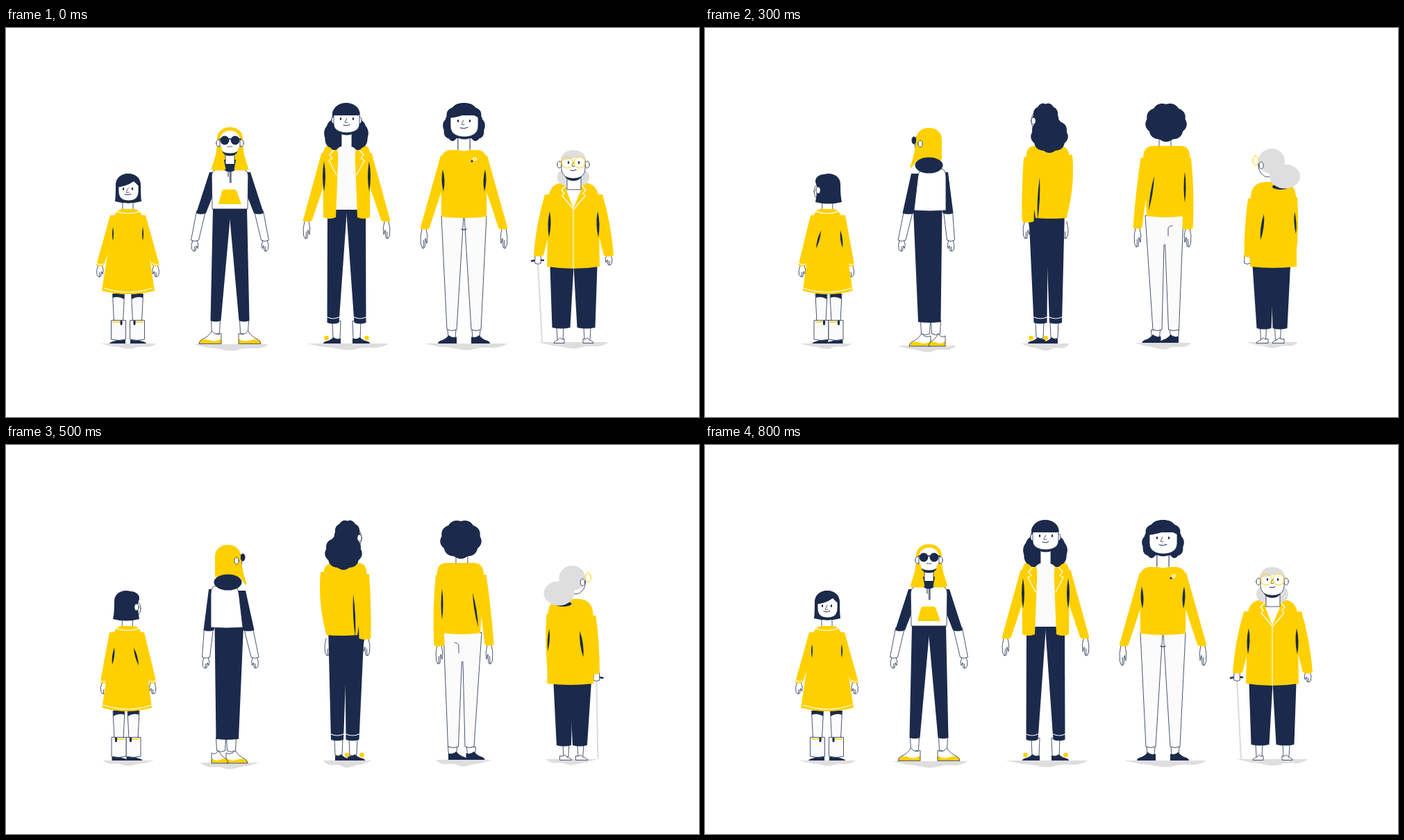
Write an HTML page with a canvas that moves like this. It is 998 px wide and 561 px high and loops after 3100 ms.

```html
<!DOCTYPE html>
<html lang="en">
<head>
<meta charset="utf-8">
<title>Turning figures</title>
<style>
html, body { margin: 0; width: 100%; height: 100%; overflow: hidden; background: #fff; }
canvas { display: block; }
</style>
</head>
<body>
<canvas id="c" width="998" height="561"></canvas>
<script>
const g = document.getElementById('c').getContext('2d');
const N = '#1b2a4b', Y = '#ffd000', G = '#dedede', W = '#fff', O = '#fbfbfb';
g.lineCap = g.lineJoin = 'round';

const fill = (c, d) => { g.fillStyle = c; g.fill(new Path2D(d)); };
const line = (d, c = N, w = 0.8) => { g.strokeStyle = c; g.lineWidth = w; g.stroke(new Path2D(d)); };
const both = (d, c = W) => { fill(c, d); line(d); };
const oval = (x, y, rx, ry = rx) =>
  `M${x - rx} ${y}a${rx} ${ry} 0 1 0 ${2 * rx} 0a${rx} ${ry} 0 1 0 ${-2 * rx} 0Z`;

function scaleAt(ax, k, draw) {
  g.save();
  g.translate(ax, 0);
  g.scale(k, 1);
  g.translate(-ax, 0);
  draw();
  g.restore();
}
const pair = (ax, draw) => { draw(); scaleAt(ax, -1, draw); };

// Tapered strip between two points, bent sideways by bow
function limb(c, x, y, w, x2, y2, w2, bow = 0, edged = c == O || c == W) {
  const mx = (x + x2) / 2 + bow, my = (y + y2) / 2, mw = (w + w2) / 4;
  const d = `M${x - w / 2} ${y}Q${mx - mw} ${my} ${x2 - w2 / 2} ${y2}Q${x2} ${y2 + 3} ${x2 + w2 / 2} ${y2}Q${mx + mw} ${my} ${x + w / 2} ${y}Z`;
  (edged ? both : (p, k) => fill(k, p))(d, c);
}

// Garment with rounded shoulders: top a..b, bottom a2..b2
function slab(c, a, b, y, a2, b2, y2, round = 12, sag = 3) {
  const k = .2, ys = y + (y2 - y) * k;
  const d = `M${a + round} ${y}H${b - round}Q${b} ${y} ${b + (b2 - b) * k} ${ys}L${b2} ${y2}
    Q${(a2 + b2) / 2} ${y2 + sag * 2} ${a2} ${y2}L${a + (a2 - a) * k} ${ys}Q${a} ${y} ${a + round} ${y}Z`;
  c == W ? both(d, c) : fill(c, d);
}
const slit = (x, y, h, lean = 0, w = 3) =>
  fill(N, `M${x} ${y}Q${x + lean / 2 + w} ${y + h * .5} ${x + lean} ${y + h}Q${x + lean / 2 - w} ${y + h * .5} ${x} ${y}Z`);

function shadow(a, b, y, h = 10) {
  const s = (b - a) / 5;
  fill(G, `M${a} ${y}H${b}q${-s * .4} ${h * .7} ${-s} ${h * .6}t${-s} ${h * .2}t${-s} 0t${-s} ${-h * .3}Z`);
}
function hand(x, y, h = 18, flip = 1) {
  const p = (u, v) => `${x + u * flip} ${y + v * h}`;
  both(`M${p(-3, 0)}Q${p(-6, .4)} ${p(-4.500, .8)}L${p(-2, 1)} ${p(1, .95)} ${p(2, .5)} ${p(4, .75)}Q${p(6, .4)} ${p(3, 0)}`);
  line(`M${p(-1, .95)}L${p(-.5, .6)}`);
}
const shoePath = (x, y, w, h) =>
  `M${x} ${y}V${y - h * .8}Q${x + w * .25} ${y - h * .6} ${x + w * .42} ${y - h}Q${x + w * .6} ${y - h * .5} ${x + w * .85} ${y - h * .35}Q${x + w} ${y - h * .2} ${x + w} ${y}Z`;
const shoe = (x, y, w, h) => fill(N, shoePath(x, y, w, h));
const slipper = (x, y, w) => both(shoePath(x, y, w, 7));
const pump = (x, w) => { shoe(x, 455, w, 9); fill(Y, oval(x + w * .82, 447, 3.3)); };
function sneaker(x, y, w) {
  const d = shoePath(x, y, w, 18);
  fill(W, d);
  fill(Y, `M${x} ${y}h${w}q${-w * .05} -6 ${-w * .22} -6t${-w * .35} 2T${x} ${y - 7}Z`);
  line(d);
}
const ankle = (x, y, w, y2) => limb(W, x, y, w, x, y2, w - 2);
function neck(x, y, y2, w = 15) {
  fill(W, `M${x - w / 2} ${y}h${w}V${y2}h${-w}Z`);
  line(`M${x - w / 2} ${y}V${y2}m${w} 0V${y}`);
}

// Face with the chin's shadow behind it
function head(a, b, t, y, dx = 0) {
  const m = (a + b) / 2, ym = (t + y) / 2;
  const jaw = `V${ym}C${a} ${y - 3} ${m - 8} ${y} ${m} ${y}S${b} ${y - 3} ${b} ${ym}V${t}`;
  g.save();
  g.translate(m + dx, 3.500);
  g.scale(.8, 1);
  g.translate(-m, 0);
  fill(N, `M${a} ${ym}${jaw.replace(`V${t}`, '')}`);
  g.restore();
  fill(W, `M${a} ${t}${jaw}`);
  line(`M${a} ${t}${jaw}`);
}
const ear = (x, y) => both(oval(x, y, 3.2, 5));
function face(v, a, b, y, nose, mouth, my, w = 9) {
  if (v < 2) fill(N, oval(a, y, 1.2, 2));
  fill(N, oval(b, y, 1.2, 2));
  line(`M${nose} ${y - 1}l-3 6q1 1.500 4 0`);
  line(`M${mouth} ${my}q${w / 2} 2 ${w} -.5`, N, 1);
}

// Hair: scalloped cloud, smooth bob, parted fringe
function cloud(cx, cy, rx, ry, n = 9, amp = .07) {
  g.beginPath();
  for (let i = 0; i < 120; i++) {
    const t = i / 60 * Math.PI, k = 1 - amp + amp * Math.abs(Math.sin(n * t / 2));
    g.lineTo(cx + rx * k * Math.sin(t), cy - ry * k * Math.cos(t));
  }
  g.fillStyle = N;
  g.fill();
}
const dome = (a, b, top, y) => {
  const k = top - (y - top) / 3;
  return `M${a} ${y}C${a} ${k} ${b} ${k} ${b} ${y}`;
};
function bob(c, a, b, top, low, flare = 1) {
  const y = top + (b - a) * .45, m = (y + low) / 2 + 5;
  fill(c, `${dome(a, b, top, y)}Q${b} ${m} ${b + flare} ${low}Q${(a + b) / 2} ${low + 5} ${a - flare} ${low}Q${a} ${m} ${a} ${y}Z`);
}
const fringe = (c, a, b, top, y, px, py) =>
  fill(c, `${dome(a, b, top, y)}Q${px + 4} ${(y + py) / 2} ${px} ${py}Q${(a + px) / 2 + 2} ${y - 1} ${a} ${y}Z`);

function girl(v) {
  const flat = v % 4 == 0, back = v > 2, o = flat ? 0 : back ? 1.5 : 0;
  shadow(136 + o, back ? 211 : 217, 455, 8);
  const leg = x => {
    limb(O, x, 384, 17, x, 424, 13);
    fill(N, `M${x - 8} 383h16v8q-8 -5 -16 -2Z`);
    shoe(x + 10, 455, -23, 7);
    limb(O, x, 422, 21, x, 449, 21);
    line(`M${x - 8} 424h14`, Y, 1.4);
    line(`M${x + 4} 423v4`, N, 3);
  };
  if (flat) pair(175.5, () => leg(162));
  else [166, 187].forEach(x => leg(x + o));
  neck(175.5 + o / 2, 246, 262);
  const sleeve = (x, hx, s) => {
    hand(hx, 343, 16, s);
    limb(Y, x, 270, 14, hx, 342, 11);
    line(`M${hx - 5} 339q5 4 10 1`, W, 1.2);
  };
  sleeve(flat ? 157 : 159, flat ? 135.5 : 140, 1);
  sleeve(flat ? 194 : 195, (flat ? 215.5 : 209) + o / 2, -1);
  slab(Y, 156, 196, 261, flat ? 138 : 141, flat ? 214 : 211 + o, 379, 12, 5);
  if (flat) pair(175.5, () => slit(154, 287, 20, 0, 2));
  else {
    back ? slit(167, 292, 26, -7) : slit(153, 291, 30);
    slit(back ? 195 : 186, 292, 25, back ? 3 : 12);
  }
  line('M158 264Q175 271 194 264M141 375Q176 387 211 375', W, 1.2);
  if (back) {
    if (!flat) both(oval(171, 236, 14, 15));
    bob(N, flat ? 157 : 161, 195, 210, 251, 2);
    fill(N, oval(171, 221, 12, 10));
    if (!flat) ear(163, 234);
  } else if (flat) {
    bob(N, 158, 194, 210, 250);
    head(162, 191, 220, 249);
    face(v, 169, 182, 232, 176, 171, 240);
    fringe(N, 158, 194, 210, 230, 184, 221);
  } else {
    bob(N, 168, 195, 210, 250, 3);
    head(156, 186, 220, 249, 3);
    ear(187, 234);
    face(v, 159.5, 170, 232, 163, 160, 240, 8);
    fringe(N, 157, 192, 210, 229, 180, 221);
  }
}

function teen(v) {
  const flat = v % 4 == 0, back = v > 2, o = back ? 3 : 0;
  const arm = (x, y, ex, hx, s, w = 14) => {
    hand(hx, 306, 16, s);
    limb(W, ex, 264, 13, hx, 306, 11);
    limb(N, x, y, 18, ex, 267, w);
  };
  if (flat) {
    shadow(269, 378, 456);
    pair(322.5, () => {
      ankle(302, 421, 13, 440);
      sneaker(310, 455, -32);
      arm(302, 208, 281, 272, 1);
      limb(N, 311, 260, 26, 302, 422, 15);
    });
    slab(W, 296, 349, 203, 297, 348, 261, 12, 0);
    fill(N, 'M312 190H333V202Q323 212 312 203Z');
    neck(322.5, 178, 196, 13);
  } else {
    shadow(277, back ? 362 : 366, 457 + o / 3);
    [316, 331].forEach(x => ankle(x + o / 2, 422, 14, 441));
    sneaker(322 + o, 457 + o / 2, -31);
    sneaker(343 + o, 457 + o / 2, back ? -24 : -33);
    slab(N, 297 + o, 340 + o / 2, 261, 307, 338 + o / 2, 424, 0, 1);
    arm(300 + o * 2, 210, 290 + o, 282 + o / 2, 1, 14 + o);
    arm(338 + o, 208, 347 + o, 351 + o, -1, 15);
    slab(W, 296 + o * 4, 338 + o * 3, 203, 292 + o * 3, 341 + o * 2, 263, 8, 1);
    if (!back) {
      fill(N, 'M303 190L336 191Q345 204 328 205L302 201Z');
      neck(311, 181, 195, 12);
    }
  }
  if (!back && v < 2) {
    const x = flat ? 322.5 : 307, w = flat ? 33 : 25;
    slab(Y, x - 11, x + 9, 233, x - w / 2, x + w / 2, 254, 2, 0);
    line(flat ? 'M320 203v11M324 203v20' : 'M301 203l-2 11M304 203l-2 20', N, 1.1);
  }
  if (back) {
    if (!flat) {
      both(oval(315, 167, 13, 17));
      fill(N, oval(301, 162, 3.500, 5.5));
      line('M301 160h11', N, 2);
    }
    bob(Y, 304, 341, 144, flat ? 204 : 190, flat ? 8 : 0);
    if (!flat) {
      limb(Y, 312, 166, 17, 297, 200, 3, 2);
      ear(310, 167);
    }
    fill(N, oval(322.5, 198, 20, 11.5));
  } else if (flat) {
    bob(Y, 304, 341, 143, 203, 8);
    fill(N, 'M312 190H333V202Q323 212 312 203Z');
    neck(322.5, 178, 196, 13);
    line('M322.5 203v20');
    pair(322.5, () => ear(306, 166));
    head(308, 337, 160, 181);
    fill(W, dome(308, 337, 148, 162));
    fill(N, oval(315, 162, 6.5) + oval(330, 162, 6.5));
    line('M308 160h30', N, 1.4);
    line('M319 171h7');
    pair(322.5, () => limb(Y, 308, 172, 5, 306, 204, 21));
  } else {
    bob(Y, 303, 336, 144, 178, 0);
    head(301, 327, 160, 182);
    fill(W, dome(301, 327, 147, 163));
    fill(N, oval(303, 161, 5.5, 6) + oval(313, 161, 6));
    line('M298 160h33', N, 1.4);
    line('M306 171q3 2 6 0');
    ear(328, 167);
    limb(Y, 331, 168, 10, 327, 202, 19);
    limb(Y, 302, 176, 3, 298, 199, 13);
  }
}

function boss(v) {
  const flat = v % 4 == 0, back = v > 2, o = back ? 3 : 0;
  const leg = (x, x2, w) => {
    limb(N, x, 262, 28, x2, 425, w);
    line(`M${x2 - w / 2} 417q${w / 2} 4 ${w} 0`, W, 1.2);
  };
  if (flat) {
    shadow(433, 551, 455);
    pair(490.5, () => {
      ankle(476, 423, 12, 448);
      pump(482, -25);
      hand(433, 279, 25);
      leg(477, 471, 17);
    });
    slab(back ? Y : O, 474, 507, 170, 474, 507, back ? 273 : 260, 2, 0);
    neck(490.5, 148, 170);
    pair(490.5, () => {
      limb(Y, 464, 180, 19, 434, 278, 13);
      slab(Y, 456, 479, 170, 457, 475, 273, 8, 2);
      slit(458, 192, 44, 0, 4);
      if (!back) line('M473 175l-7 8 4 5 -5 3 11 21', W, 1.2);
    });
  } else {
    shadow(455, 525, 455, 11);
    [479, 500].forEach(x => ankle(x + o, 423, 12, 447));
    pump(487 + o, -25);
    pump(505 + o, back ? -21 : -26);
    hand(460 + o, 279, 25);
    hand(512 + o * 2, 279, 25, -1);
    leg(477 + o, 480 + o, 19);
    leg(501 + o, 499 + o * 2, 18);
    neck(488 + o / 2, 150, 172);
    if (back) {
      limb(Y, 520, 183, 18, 516, 272, 10, 8);
      limb(Y, 469, 186, 20, 465, 279, 17, -2);
      slab(Y, 460, 526, 170, 476, 521, 274, 16, 1);
      slit(482, 215, 62, -3);
    } else {
      slab(O, 468, 492, 170, 463, 487, 263, 2, 0);
      limb(Y, 466, 170, 12, 460, 276, 9, -3);
      slab(Y, 486, 523, 169, 484, 519, 274, 12, 0);
      limb(Y, 515, 184, 17, 515, 280, 16, 7);
      slit(508, 210, 43, -4, 4);
      line('M493 175l7 9 -5 4 4 3 -13 23', W, 1.2);
    }
  }
  if (back) {
    if (!flat) both(oval(484, 134, 14, 17));
    cloud(490.5, 129, flat ? 21 : 19, 21);
    cloud(flat ? 490 : 496, 154, flat ? 32 : 27, 26);
    if (!flat) ear(473, 134);
  } else if (flat) {
    cloud(489.5, 130, 21, 22);
    pair(490, () => cloud(473, 154, 15, 22, 7));
    neck(490.5, 148, 170);
    pair(490.5, () => ear(472, 133));
    head(472, 509, 126, 151);
    face(v, 482, 500, 131, 491, 486, 140);
    fringe(N, 470, 510, 108, 126, 502, 114);
  } else {
    cloud(488, 130, 21, 22);
    cloud(506, 150, 14, 24, 7);
    cloud(470, 154, 10, 17, 6);
    neck(488, 148, 169);
    head(468, 497, 124, 152, 3);
    ear(497, 134);
    face(v, 472, 483, 131, 474, 471, 141);
    fringe(N, 466, 505, 108, 126, 490, 117);
  }
}

function knit(v, m) {
  const flat = v % 4 == 0, back = v > 2, o = back ? 3 : 0;
  if (flat) {
    shadow(603, 722, 455);
    pair(659.5, () => {
      ankle(642, 436, 12, 446);
      shoe(649, 455, -27, 12);
      hand(602, 289, 29);
      limb(O, 643, 271, 32, 642, 435, 14);
    });
    line('M656 290q4 2 7 0', N, 1.2);
    pair(659.5, () => limb(Y, 635, 184, 18, 603, 289, 13));
    slab(Y, 626, 693, 176, 627, 692, 272, 15, 2);
    pair(659.5, () => slit(629, 204, 32, 1, 4));
  } else {
    shadow(619, 700, 454);
    [646, 673].forEach(x => ankle(x + o, 436, 13, 446));
    shoe(655 + o / 2, 454, -27, 12);
    shoe(679 + o, 454, -27, 12);
    hand(623, 288, 28);
    hand(689 + o * 2, 288, 28, -1);
    limb(O, 645 + o, 271, 28, 645.5 + o * 2, 435, 13);
    limb(O, 672 + o, 271, 28, 673.5 + o / 2, 435, 15);
    fill(O, `M${650 + o} 272h16v40h-10Z`);
    line(`M${back ? 667 : 651} 300v-11q0 -3 ${back ? 6 : -5} -4`);
    limb(Y, 633 + o, 187, 17, 623, 288, 13, -2);
    limb(Y, 689 + o, 187, 16, 692 + o, 289, 15, 4);
    slab(Y, 627 + o, 697 + o, 170, 630 + o * 2, 684 + o * 2, 271, 16, 2);
    slit(back ? 647 : 629, 213, 50, back ? -8 : 0);
    slit(back ? 691 : 674, 207, 45, back ? 0 : 8);
  }
  neck(flat ? 659.5 : 659.5 + o, 154, flat ? 175 : 170, 17);
  if (v < 2) {
    if (flat) fill(W, 'M651 175h17q-8 5 -17 0Z');
    const x = flat ? 673 : m ? 637 : 664;
    line(oval(x + 2, 189, 2), W, 1.6);
    fill(N, oval(x - 2, 192, 1.6));
  }
  if (back) cloud(flat ? 659.5 : 664, 136, 30, 28);
  else if (flat) {
    cloud(659.5, 131, 27, 23);
    pair(659.5, () => cloud(643, 143, 14, 20, 7, .1));
    neck(659.5, 152, 175, 17);
    head(640, 680, 126, 157);
    face(v, 651, 668, 134, 659, 654, 144, 11);
    fringe(N, 637, 682, 108, 130, 668, 121);
  } else {
    cloud(665, 131, 24, 23);
    cloud(677, 140, 14, 21, 7, .1);
    cloud(641, 146, 9, 12, 5, .1);
    neck(659.5, 152, 171, 17);
    head(637, 669, 124, 156, 4);
    ear(670, 134);
    face(v, 641, 653, 132, 645, 642, 143);
    fringe(N, 636, 681, 108, 129, 663, 121);
  }
}

function elder(v, m) {
  const flat = v % 4 == 0, back = v > 2, o = back ? 2 : 0;
  const cane = (x, x2) => {
    line(`M${x} 339L${x2} 452`, G, 2.2);
    line(`M${x - 9} 336q9 -2 17 -1`, N, 2.4);
  };
  const fist = x => limb(W, x, 327, 8, x, 339, 9);
  if (flat) {
    shadow(766, 868, 453);
    pair(817.5, () => {
      ankle(798, 432, 10, 449);
      slipper(804, 454, -15);
      limb(N, 800.5, 344, 34, 799.5, 432, 26);
    });
    scaleAt(817, back ? -1 : 1, () => { cane(766, 772); fist(766); hand(868, 327, 15, -1); });
    pair(817.5, () => limb(Y, 790, 240, 28, 767, 328, 14, -5));
    slab(Y, 782, 853, 223, 779, 855, 344, 22);
    pair(817.5, () => slit(783, 264, 38, -1, 4));
    if (!back) {
      fill(W, 'M807 223h21v11l-11 26 -10 -26Z');
      line('M807 233h21');
      pair(817.5, () => line('M807 226l-7 8 4 4 -3 4 16 19', W, 1.2));
      line('M817 261v85', W, 1.2);
    }
  } else {
    shadow(780, 854, 453, 9);
    [806, 827].forEach(x => ankle(x - o, 432, 9, 449));
    slipper(811, 454, -17);
    slipper(834, 454, -17);
    limb(N, 806 - o, 343, 31, 807 - o, 433, 21);
    limb(N, 831 - o, 343, 28, 830 - o, 433, 21);
    if (m ? back : v == 1) cane(781, 779);
    fist(781);
    limb(Y, 792, 246, 20, 782, 329, 11, -3);
    limb(Y, 842, 244, 22, 843, 330, 16, 4);
    slab(Y, 786, 851, 222, 785, 852, 344, 22, 2);
    if (back) {
      slit(805, 268, 38, -5, 4);
      slit(849, 265, 32, 2);
      fill(N, oval(829, 229, 12, 4));
    } else {
      fill(W, 'M803 222h23l-8 12q-17 4 -23 21Z');
      line('M802 233h17');
      line('M830 222l6 8 -4 5 2 4 -39 17q-9 44 -8 88', W, 1.2);
      slit(832, 265, 41, -2);
      if (m) cane(835, 836);
      fist(834);
    }
  }
  const bun = (x, y, r, ry = r) => fill(G, oval(x, y, r, ry));
  if (flat) {
    pair(817, () => bun(806, 215, 12));
    if (back) {
      bob(G, 799, 835, 175, 214, 0);
      bun(817, 214, 20, 17);
    } else {
      neck(818, 212, 232, 20);
      pair(817, () => ear(797, 197));
      head(800, 834, 188, 217);
      fringe(G, 799, 835, 176, 191, 826, 185);
      face(v, 810, 825, 194, 818, 813, 205, 8);
      line(oval(808, 194, 8) + oval(826, 194, 8), Y, 1);
    }
  } else if (back) {
    both(oval(811, 198, 14, 17));
    line(oval(793, 191, 4, 7) + 'M797 190h10', Y, 1);
    bun(816, 192, 19, 18);
    bun(835, 214, 22, 17.5);
    ear(801, 198);
  } else {
    bun(843, 212, 15.5);
    neck(815, 210, 224, 23);
    head(797, 831, 188, 217, 4);
    fringe(G, 798, 836, 175, 190, 826, 186);
    limb(G, 831, 184, 9, 832, 208, 6);
    ear(829, 198);
    face(v, 801, 814, 192, 805, 802, 204);
    line(oval(796, 191, 6, 8) + oval(816, 192, 9) + 'M825 189l9 2', Y, 1);
  }
}

const cast = [[girl, 175.5], [teen, 321], [boss, 491], [knit, 659.5], [elder, 815.7]];
const start = performance.now();

// Eight poses of a full turn; the second half mirrors the first
function frame() {
  const t = (performance.now() - start) % 3100;
  const step = Math.min(8, Math.floor(t / 100));
  const m = step > 4 && step < 8;
  const view = step > 4 ? 8 - step : step;
  g.fillStyle = W;
  g.fillRect(0, 0, 998, 561);
  for (const [draw, ax] of cast)
    scaleAt(ax, (m ? -1 : 1) * (view == 2 ? .88 : 1), () => draw(view, m));
  requestAnimationFrame(frame);
}
frame();
</script>
</body>
</html>
```
